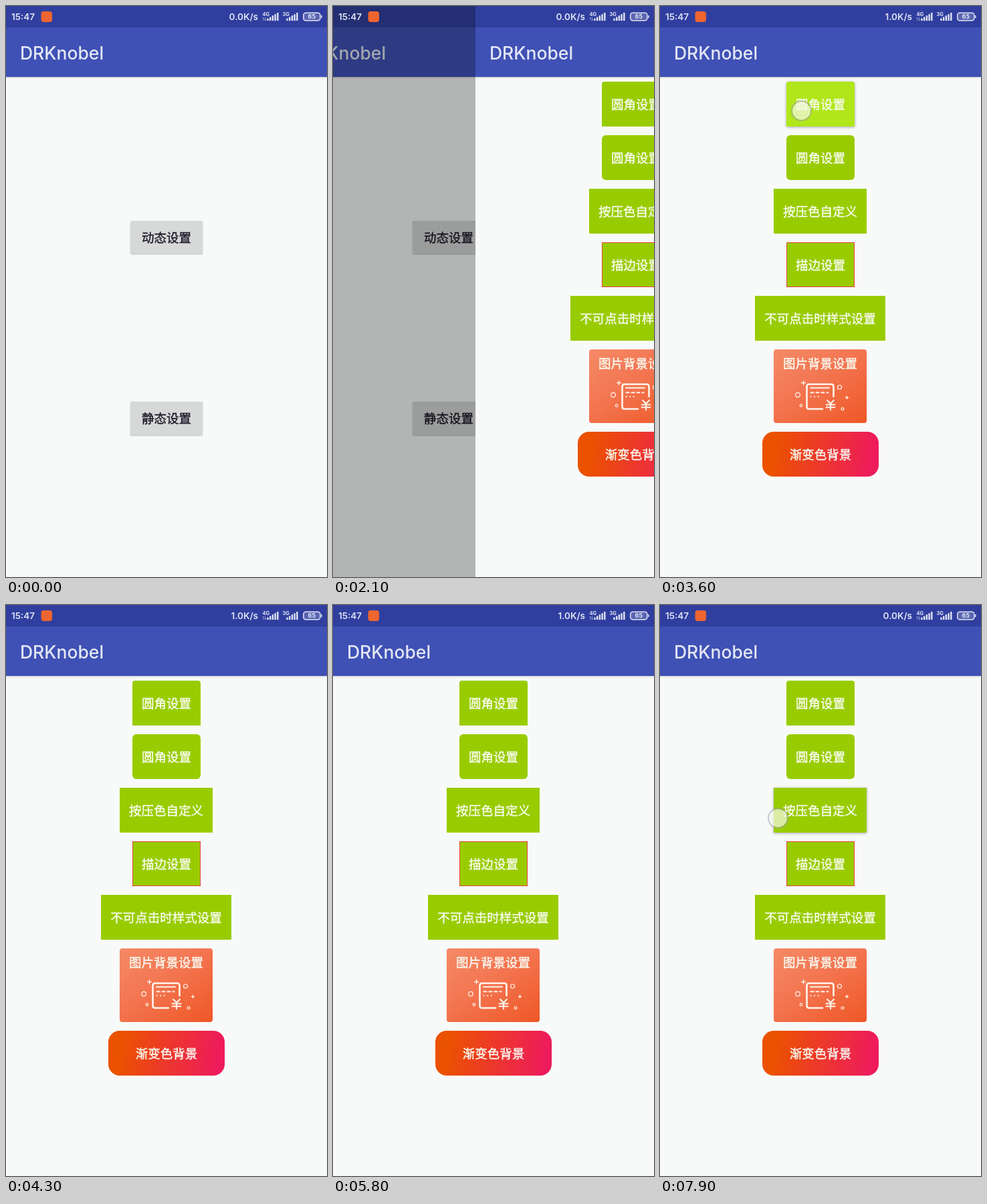
An HTML page for the animation above (8000 ms loop, 480 px wide and 853 px high).

```html
<!DOCTYPE html>
<html lang="zh">
<head>
<meta charset="utf-8">
<style>
html, body { margin: 0; width: 100%; height: 100%; overflow: hidden; background: #f8faf9; }
#stage { position: absolute; left: 0; top: 0; width: 480px; height: 853px; overflow: hidden; font-family: "Noto Sans CJK SC", "Noto Sans CJK", "Noto Sans", sans-serif; }
.screen { position: absolute; inset: 0; background: #f8faf9; overflow: hidden; }
.screen::before { content: ""; position: absolute; left: 0; top: 0; width: 480px; height: 32px; background: #303f9f; }
.bar { position: absolute; left: 0; top: 32px; width: 480px; height: 74px; background: #3f51b5; box-shadow: 0 1px 3px rgba(0, 0, 0, .18); }
.bar span { position: absolute; left: 21px; top: 0; font: 500 26.5px/76px Inter, sans-serif; color: #e4e7f5; }
.btn { position: absolute; box-sizing: border-box; display: flex; align-items: center; justify-content: center; background: #99cc00; color: #f9fbf2; font-size: 18.5px; font-weight: 500; line-height: 1; white-space: nowrap; -webkit-text-stroke: .35px currentColor; }
.plain { background: #d7d9d8; color: #1d1a29; border-radius: 2px; padding-bottom: 1px; box-shadow: 0 1px 2px rgba(0, 0, 0, .25); }
.raised { box-shadow: 0 1px 4px rgba(0, 0, 0, .35); }
#dim { position: absolute; inset: 0; background: #000; }
#touch { position: absolute; left: -15.5px; top: -15.5px; width: 31px; height: 31px; box-sizing: border-box; border: 2px solid rgba(150, 150, 175, .5); border-radius: 50%; background: rgba(246, 248, 232, .7); background-clip: padding-box; }
svg { position: absolute; left: 0; top: 0; }
#status text { font-family: Inter, sans-serif; fill: #e1e4f3; }
</style>
</head>
<body>
<div id="stage">
  <div class="screen" id="home"><div class="bar"><span>DRKnobel</span></div></div>
  <div id="dim"></div>
  <div class="screen" id="list"><div class="bar"><span>DRKnobel</span></div></div>
  <svg id="status" width="480" height="32">
    <text x="8" y="21" font-size="13.5" font-weight="600">15:47</text>
    <rect x="52.5" y="8" width="16.5" height="16" rx="4" fill="#ef6530"/>
    <text id="speed" x="377" y="21" font-size="13.5" font-weight="600" text-anchor="end"></text>
    <text x="383.5" y="14.5" font-size="7.5" font-weight="700">4G</text>
    <text x="413.5" y="14.5" font-size="7.5" font-weight="700">3G</text>
    <path d="M384 19l1-2v5M387.500 17v5l1-2" fill="none" stroke="#a9b0dc" stroke-width=".8"/>
    <path id="signal" stroke="#e1e4f3" stroke-width="2.4" fill="none"/>
    <rect x="444.800" y="10.300" width="25" height="11.400" rx="3.500" fill="#5a65b2" stroke="#e1e4f3" stroke-width="1.500"/>
    <path d="M471.800 14v4" stroke="#e1e4f3" stroke-width="1.500"/>
    <text x="457.3" y="19.3" font-size="9" font-weight="700" text-anchor="middle">65</text>
  </svg>
  <div id="touch"></div>
</div>
<script>
const $ = id => document.getElementById(id);
const LOOP = 8000, STEP = 100, SLIDE_START = 1958, SLIDE_TIME = 600;

function addButton(parent, label, x, y, w, h, style = {}, cls = '') {
  const el = document.createElement('div');
  el.className = 'btn ' + cls;
  el.textContent = label;
  Object.assign(el.style, { left: x + 'px', top: y + 'px', width: w + 'px', height: h + 'px' }, style);
  $(parent).append(el);
  return el;
}

addButton('home', '动态设置', 186, 321, 108, 49, {}, 'plain');
const staticBtn = addButton('home', '静态设置', 186, 591, 108, 50, {}, 'plain');
const cornerBtn = addButton('list', '圆角设置', 189, 113, 102, 67, { borderRadius: '4px 4px 0 0' });
const roundBtn = addButton('list', '圆角设置', 189, 193, 102, 67, { borderRadius: '6px' });
const colorBtn = addButton('list', '按压色自定义', 170, 273, 139, 67);
addButton('list', '描边设置', 189, 353, 102, 67, { border: '1.3px solid #e5403a' });
addButton('list', '不可点击时样式设置', 142, 433, 195, 67);
const imageBtn = addButton('list', '图片背景设置', 170, 513, 139, 110, {
  borderRadius: '4px', alignItems: 'flex-start', paddingTop: '11px',
  background: 'linear-gradient(145deg, #f58a67, #f37550 45%, #ef5726)'
});
addButton('list', '渐变色背景', 153, 636, 174, 67, {
  borderRadius: '17px', background: 'linear-gradient(100deg, #eb5200 12%, #ee1c5a 92%)'
});

imageBtn.insertAdjacentHTML('beforeend', `
  <svg width="139" height="110" viewBox="170 513 139 110" fill="none" stroke="#fff5ed" stroke-linecap="round">
    <path d="M243 602h-20q-3.500 0-3.500-3.500v-30q0-3.500 3.500-3.500h33q3.500 0 3.500 3.500v15" stroke-width="2.600"/>
    <path d="M225 570.500h28" stroke-width="2.200"/>
    <path d="M225.500 577.500h26" stroke-width="2.200" stroke-dasharray="4 4"/>
    <path d="M225.500 583.500h12" stroke-width="2.200" stroke-dasharray=".1 5.500"/>
    <path d="M250 589l5 5l5-5M255 594v9.500M248.500 595.500h13M248.500 599.500h13" stroke-width="2.100"/>
    <path d="M214.500 560v6M211.500 563h6M279.500 583v4M277.500 585h4" stroke-width="1.300"/>
    <g stroke-width="1.200"><circle cx="206" cy="581" r="3.300"/><circle cx="268.500" cy="569.500" r="3"/>
    <circle cx="211" cy="597" r="1.800"/><circle cx="273" cy="602" r="1.900"/></g>
  </svg>`);

let bars = '';
for (const x of [391.5, 420.5])
  for (let i = 0; i < 5; i++) bars += `M${x + i * 3.7} 22v${-3.5 - i * 2.1}`;
$('signal').setAttribute('d', bars);

// Touch: start, end, from x, y, to x, y
const touches = [
  [1200, 1800, 215, 617, 215, 617],
  [3300, 4000, 211, 156, 211, 156],
  [4700, 5400, 200, 229, 200, 229],
  [6600, 8000, 183, 327, 176, 318]
];
// Press: button, start, end of colour, end of shadow, colour
const presses = [
  [staticBtn, 1300, 1800, 1900, '#c4c6c5'],
  [cornerBtn, 3400, 4000, 4100, '#b1e61b'],
  [roundBtn, 4800, 5400, 5500, '#b1e61b'],
  [colorBtn, 6700, 7900, 8000, '#86b800']
];

function draw(t) {
  const u = Math.min(1, Math.max(0, (t - SLIDE_START) / SLIDE_TIME));
  const p = 1 - (1 - u) ** 3;
  $('home').style.transform = `translateX(${Math.round(-120 * p)}px)`;
  $('list').style.transform = `translateX(${Math.round(480 * (1 - p))}px)`;
  $('dim').style.opacity = p / 2;
  $('speed').textContent = t >= 3000 && t < 7000 ? '1.0K/s' : '0.0K/s';

  for (const [el, start, end, settle, color] of presses) {
    el.style.backgroundColor = t >= start && t < end ? color : '';
    el.classList.toggle('raised', t >= start && t < settle);
  }

  const hit = touches.find(([start, end]) => t >= start && t < end);
  $('touch').style.display = hit ? '' : 'none';
  if (hit) {
    const [start, end, x0, y0, x1, y1] = hit;
    const k = Math.min(1, (t - start) / (end - start - STEP));
    $('touch').style.transform = `translate(${x0 + (x1 - x0) * k}px, ${y0 + (y1 - y0) * k}px)`;
  }
}

const origin = performance.now();
function tick() {
  const t = (performance.now() - origin) % LOOP;
  draw(Math.floor(t / STEP) * STEP);
  requestAnimationFrame(tick);
}
tick();
</script>
</body>
</html>
```
